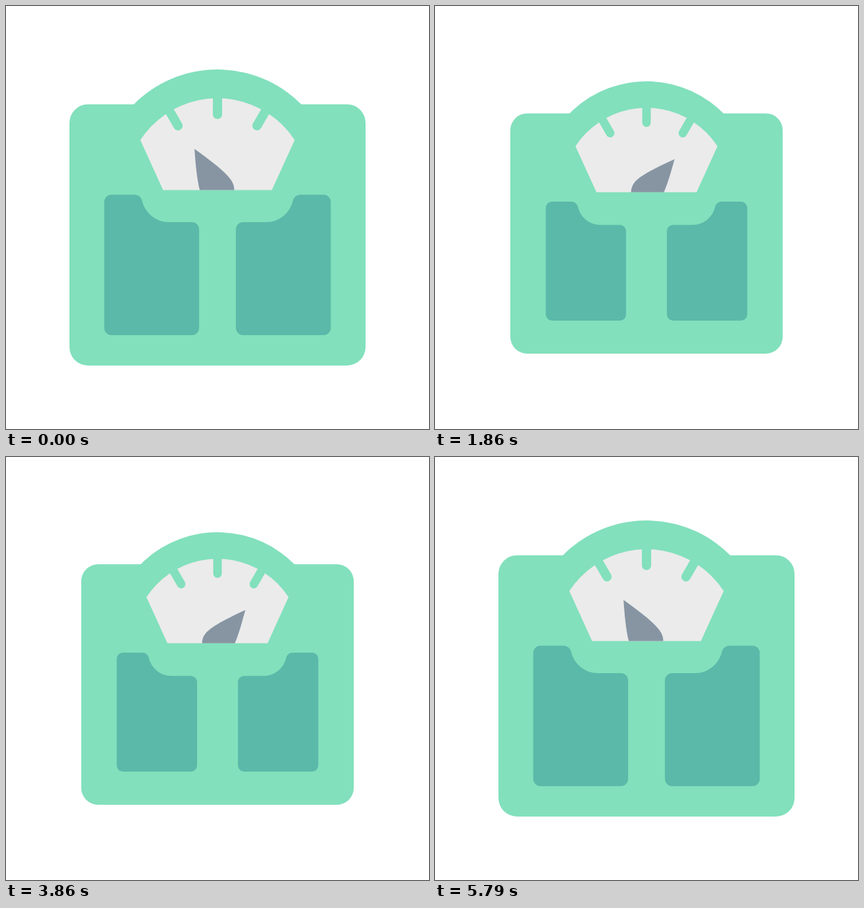
An HTML page with a canvas for the animation above (6 s loop, 640x640 px).

```html
<!DOCTYPE html>
<html lang="en">
<head>
<meta charset="utf-8">
<title>Bathroom scale</title>
<style>
  html, body { margin: 0; width: 100%; height: 100%; overflow: hidden; background: #fff; }
  canvas { display: block; width: 640px; height: 640px; }
</style>
</head>
<body>
<canvas id="stage" width="640" height="640"></canvas>
<script>
const ctx = document.getElementById('stage').getContext('2d');
const MINT = '#82e0bc', TEAL = '#5bb9a9', PALE = '#ebebeb', SLATE = '#8795a3';
const FPS = 14, CYCLE = 42;          // drawn steps per second and per cycle
const PRESS = 28, HOLD = 56;         // keys, in 1/30 s
const REST_ANGLE = -29.3, LOAD_ANGLE = 40.4, SWAY = 10;

// cubic-bezier(.4, 0, .4, 1)
function ease(x) {
  if (x <= 0) return 0;
  if (x >= 1) return 1;
  let lo = 0, hi = 1;
  for (let i = 0; i < 24; i++) {
    const s = (lo + hi) / 2;
    if (1.2 * s * (1 - s) + s * s * s < x) lo = s; else hi = s;
  }
  return lo * lo * (3 - 2 * lo);
}

const ramp = (k, start, length) => ease((k - start) / length);
const pulse = (k, delay, length) =>
  ramp(k, delay, length) - ramp(k, HOLD + delay, length);
const shrink = p => 1 - 0.08 * p;

function zoom(cx, cy, s) {
  ctx.translate(cx, cy);
  ctx.scale(s, s);
  ctx.translate(-cx, -cy);
}

function drawBody() {
  ctx.fillStyle = MINT;
  ctx.beginPath();
  ctx.roundRect(96, 148.7, 448, 395.3, 28);
  ctx.fill();
  ctx.beginPath();
  ctx.arc(320, 274.2, 178.2, Math.PI * 1.2, Math.PI * 1.8);
  ctx.fill();
}

function dialPath() {
  const a = Math.atan2(202.8 - 279.1, 116.8);
  ctx.beginPath();
  ctx.moveTo(237.7, 278.4);
  ctx.arc(320, 279.1, 139.5, Math.PI - a, a);
  ctx.lineTo(402.3, 278.4);
  ctx.closePath();
}

function drawTicks() {
  ctx.strokeStyle = MINT;
  ctx.lineWidth = 14;
  ctx.lineCap = 'round';
  ctx.beginPath();
  ctx.moveTo(320, 130);
  ctx.lineTo(320, 164);
  for (const side of [-1, 1]) {
    ctx.moveTo(320 + side * 79.7, 146.7);
    ctx.lineTo(320 + side * 59.7, 181.3);
  }
  ctx.stroke();
}

function drawNeedle(angle) {
  ctx.save();
  dialPath();
  ctx.clip();
  ctx.translate(320, 278.4);
  ctx.rotate(angle * Math.PI / 180);
  ctx.fillStyle = SLATE;
  ctx.beginPath();
  ctx.moveTo(0, -71.2);
  ctx.bezierCurveTo(9.6, -50.5, 25.5, -17, 25.4, 0);
  ctx.arc(0, 0, 25.4, 0, Math.PI);
  ctx.bezierCurveTo(-25.5, -17, -9.6, -50.5, 0, -71.2);
  ctx.fill();
  ctx.restore();
}

function drawPad(mirrored, press) {
  ctx.save();
  if (mirrored) {
    ctx.translate(640, 0);
    ctx.scale(-1, 1);
  }
  zoom(220.4, 391.75, shrink(press));
  ctx.fillStyle = TEAL;
  ctx.beginPath();
  ctx.moveTo(194.5, 285.5);
  ctx.bezierCurveTo(200, 285.5, 204.6, 289.3, 205.8, 294.4);
  ctx.arc(246.3, 285.6, 41.4, Math.PI - 0.213, Math.PI / 2, true);
  ctx.arcTo(292.2, 327, 292.2, 338, 11);
  ctx.arcTo(292.2, 498, 281, 498, 11);
  ctx.arcTo(148.6, 498, 148.6, 487, 11);
  ctx.arcTo(148.6, 285.5, 160, 285.5, 11);
  ctx.closePath();
  ctx.fill();
  ctx.restore();
}

function draw(k) {
  const load = pulse(k, 0, PRESS);
  const half = (HOLD - PRESS) / 2;
  const sway = ramp(k, PRESS, half) - ramp(k, PRESS + half, half);
  const angle = REST_ANGLE + (LOAD_ANGLE - REST_ANGLE) * load - SWAY * sway;

  ctx.fillStyle = '#fff';
  ctx.fillRect(0, 0, 640, 640);
  ctx.save();
  zoom(320, 320, shrink(load));
  drawBody();
  dialPath();
  ctx.fillStyle = PALE;
  ctx.fill();
  drawTicks();
  drawNeedle(angle);
  drawPad(false, pulse(k, 0, 13));
  drawPad(true, pulse(k, 12.8, 13));
  ctx.restore();
}

const begin = performance.now();
function tick() {
  const t = Math.max(0, performance.now() - begin);
  const step = Math.floor((t + 5) * FPS / 1000) % CYCLE;
  draw(step * 30 / FPS);
  requestAnimationFrame(tick);
}
tick();
</script>
</body>
</html>
```
